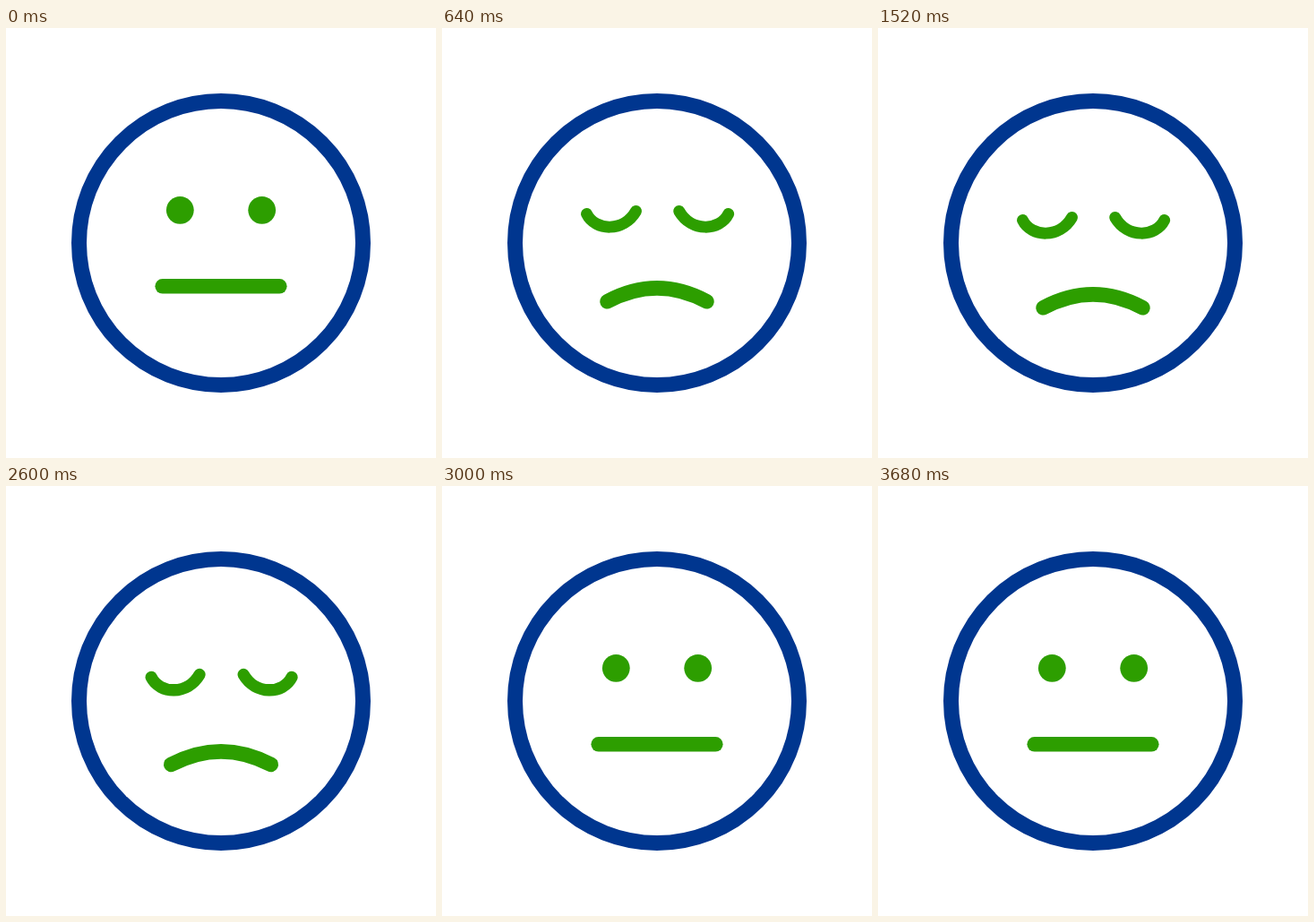
An HTML page that plays this animation: 480 px wide and 480 px high, repeating every 4000 ms.

```html
<!DOCTYPE html>
<html lang="en">
<head>
<meta charset="utf-8">
<title>Sad face</title>
<style>
  html, body { margin: 0; width: 100%; height: 100%; overflow: hidden; background: #fff; }
  svg { display: block; width: 100%; height: 100%; }
</style>
</head>
<body>
<svg viewBox="0 0 480 480" fill="none" stroke-linecap="round">
  <circle cx="240" cy="240" r="158.5" stroke="#00368f" stroke-width="17"/>
  <g id="face" stroke="#2d9e00">
    <g id="eyes"><path id="left"/><path id="right"/></g>
    <path id="mouth" stroke-width="16.6"/>
  </g>
</svg>
<script>
const LOOP = 4000, STEP = 40;
const DOT = [194.3, 203.3];
const LID = [[161.5, 207.5], [171, 227], [203, 228], [216.5, 204.5]];
const $ = id => document.getElementById(id);
const [face, eyes, left, right, mouth] = ['face', 'eyes', 'left', 'right', 'mouth'].map($);

const mix = (a, b, k) => a + (b - a) * k;
const progress = (t, from, to) => Math.min(1, Math.max(0, (t - from) / (to - from)));
const easeOut = p => Math.sin(p * Math.PI / 2);
const easeInOut = p => (1 - Math.cos(p * Math.PI)) / 2;
const curve = ([start, ...rest]) => `M${start} C${rest.join(' ')}`;

function draw(t) {
  const sad = easeInOut(progress(t, 320, 640)) - easeInOut(progress(t, 2560, 3000));
  const drop = 7 * (easeOut(progress(t, 1200, 1520)) - easeOut(progress(t, 2560, 3000)));
  const open = 1 - 0.9 * Math.sin(Math.PI * progress(t, 3400, 3680));

  // Each eye is a thick dot that unrolls into a closed lid.
  const lid = LID.map(([x, y]) => [mix(DOT[0], x, sad), mix(DOT[1], y, sad)]);
  const mirror = mix(480, 481.2, sad);
  left.setAttribute('d', curve(lid));
  right.setAttribute('d', curve(lid.map(([x, y]) => [mirror - x, y])));
  eyes.setAttribute('stroke-width', mix(30.8, 13, sad));
  eyes.setAttribute('transform', `translate(0 ${DOT[1] * (1 - open)}) scale(1 ${open})`);

  const half = mix(65.3, 55.5, sad), end = mix(288.3, 305.3, sad), bend = mix(288.3, 275.5, sad);
  mouth.setAttribute('d', `M${240 - half} ${end} Q240 ${bend} ${240 + half} ${end}`);
  face.setAttribute('transform', `translate(0 ${drop})`);
}

function tick() {
  draw(Math.floor(performance.now() % LOOP / STEP) * STEP);
  requestAnimationFrame(tick);
}
tick();
</script>
</body>
</html>
```
